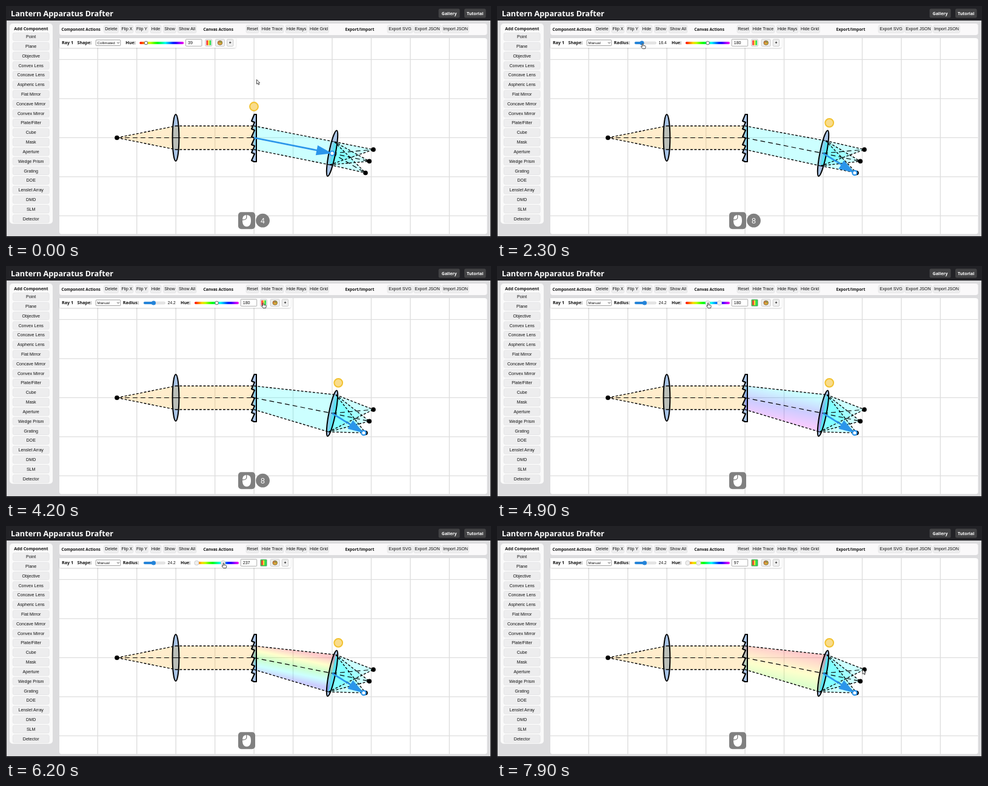
Recreate the animation shown at these times as an HTML page. Size 800 px wide and 383 px high, loop 8 s.

```html
<!DOCTYPE html>
<html lang="en">
<head>
<meta charset="utf-8">
<title>Lantern Apparatus Drafter</title>
<style>
html, body { margin: 0; width: 100%; height: 100%; overflow: hidden; background: #dcdcde; }
svg { display: block; width: 100%; height: 100%; font: 7.1px "Liberation Sans", Arial, sans-serif; }
.ui { font-family: "Open Sans", "Noto Sans", sans-serif; font-weight: 700; }
.mid { text-anchor: middle; }
.edge { stroke: #000; stroke-width: 1.35; stroke-dasharray: 3.9 2.6; }
.axis { stroke: #000; stroke-width: 1.2; stroke-dasharray: 7.8 5.2; }
.glass { fill: #a9c4e6; }
.outline { fill: none; stroke: #000; stroke-width: 2; stroke-linejoin: round; }
.cursor { fill: #fff; stroke: #222; stroke-width: .8; stroke-linejoin: round; }
</style>
</head>
<body>
<svg viewBox="0 0 800 383" preserveAspectRatio="none">
  <defs>
    <linearGradient id="spectrum"></linearGradient>
    <filter id="shadow" x="-5%" y="-30%" width="110%" height="180%">
      <feDropShadow dx="0" dy="1" stdDeviation="1.2" flood-opacity=".2"/>
    </filter>
  </defs>
  <g id="page"></g>
  <g id="scene"></g>
</svg>
<script>
const LOOP = 8000, STEP = 100, UNIT = 1.29;
const $ = id => document.getElementById(id);

const rect = (x, y, w, h, fill, r = 0, extra = '') =>
  `<rect x="${x}" y="${y}" width="${w}" height="${h}" rx="${r}" fill="${fill}" ${extra}/>`;
const text = (s, x, y, cls = '', size = 7.1, fill = '#111') =>
  `<text x="${x}" y="${y}" class="${cls}" style="font-size:${size}px" fill="${fill}">${s}</text>`;
const line = (a, b, cls) => `<line x1="${a[0]}" y1="${a[1]}" x2="${b[0]}" y2="${b[1]}" class="${cls}"/>`;
const dot = (p, r, fill, extra = '') => `<circle cx="${p[0]}" cy="${p[1]}" r="${r}" fill="${fill}" ${extra}/>`;
const poly = (points, fill, extra = '') => `<polygon points="${points.join(' ')}" fill="${fill}" ${extra}/>`;
const button = (s, cx, y, w, h = 13) =>
  rect(cx - w / 2, y, w, h, '#ededee', 2.5, 'stroke="#dfdfe1" stroke-width=".6"') + text(s, cx, y + h / 2 + 2.4, 'mid');
const hsl = h => `hsl(${h},100%,50%)`;
const stops = (from, to) => Array.from({ length: 13 }, (_, i) =>
  `<stop offset="${i / 12}" stop-color="${hsl(from + (to - from) * i / 12)}"/>`).join('');

// Eased value of a track of [time, ...values] keys.
function at(keys, t) {
  const i = keys.findIndex(k => k[0] > t);
  if (i < 0) return keys[keys.length - 1].slice(1);
  if (!i) return keys[0].slice(1);
  const a = keys[i - 1], b = keys[i], u = (t - a[0]) / (b[0] - a[0]), e = u * u * (3 - 2 * u);
  return a.slice(1).map((v, j) => v + (b[j + 1] - v) * e);
}

const MENU = ['Point', 'Plane', 'Objective', 'Convex Lens', 'Concave Lens', 'Aspheric Lens', 'Flat Mirror',
  'Concave Mirror', 'Convex Mirror', 'Plate/Filter', 'Cube', 'Mask', 'Aperture', 'Wedge Prism', 'Grating',
  'DOE', 'Lenslet Array', 'DMD', 'SLM', 'Detector'];
const TOOLS = [['Delete', 173.5, 24], ['Flip X', 199.5, 21], ['Flip Y', 224, 21], ['Hide', 247, 18],
  ['Show', 270, 21], ['Show All', 298.5, 31], ['Reset', 406.5, 21], ['Hide Trace', 439, 38],
  ['Hide Rays', 479, 36], ['Hide Grid', 516, 33], ['Export SVG', 650, 42], ['Export JSON', 695, 45],
  ['Import JSON', 741.5, 44]];

function drawPage() {
  let s = rect(0, 0, 800, 383, '#222226') + rect(1, 24, 798, 356, '#dcdcde');
  s += text('Lantern Apparatus Drafter', 8, 17.3, 'ui', 12.7, '#fff');
  s += rect(713.5, 4.5, 35, 15, '#434345', 2.5) + text('Gallery', 731, 14.8, 'ui mid', 7, '#fff');
  s += rect(756, 4.5, 35.5, 15, '#434345', 2.5) + text('Tutorial', 773.7, 14.8, 'ui mid', 7, '#fff');
  s += rect(6, 29, 71, 330.5, '#fafafa', 5) + text('Add Component', 41.3, 40, 'ui mid', 7);
  MENU.forEach((m, i) => s += button(m, 41.2, 44.3 + i * 15.81, 60));
  s += rect(88, 29, 705.5, 19, '#faf9fa', 4);
  s += text('Component Actions', 91.5, 40.6, 'ui', 6.55) + text('Canvas Actions', 325.5, 40.6, 'ui', 6.55) +
    text('Export/Import', 559.5, 40.6, 'ui', 6.7);
  TOOLS.forEach(([name, x, w]) => s += button(name, x, 31.5, w));
  s += rect(88, 53, 705.5, 323.5, '#fff', 4);
  let grid = '';
  for (let i = 0; i < 10; i++) grid += `M${151.3 + i * 64.45} 53V376.5`;
  for (let i = 0; i < 5; i++) grid += `M88 ${88.4 + i * 64.5}H793.5`;
  $('page').innerHTML = s + `<path d="${grid}" stroke="#dedede" stroke-width="1.4"/>`;
}

const SOURCE = [183, 217.5], FIRST = [280, 217.5], GRATING = [409, 217.5], LENS = [538, 243.2];
const FOCI = [[606, 237], [599.3, 256.3], [593, 275.5]];
const TILT = Math.atan2(LENS[1] - GRATING[1], LENS[0] - GRATING[0]);

const lens = ([x, y], angle, cls) =>
  `<ellipse class="${cls}" rx="5.4" ry="38.5" transform="translate(${x} ${y}) rotate(${angle})"/>`;

function drawParts(cls) {
  let d = 'M413 179H409.5';
  for (let i = 1; i <= 6; i++) d += `L405 ${177 + i * 13}L${i < 6 ? 410 : 409} ${179 + i * 13}`;
  return lens(FIRST, 0, cls) + `<path class="${cls}" d="${d}H413Z"/>` + lens(LENS, TILT * 180 / Math.PI, cls);
}

function drawBeams(radius, low, high, dual) {
  const across = r => [LENS[0] + Math.sin(TILT) * r, LENS[1] - Math.cos(TILT) * r];
  const top = across(radius * UNIT), bottom = across(-radius * UNIT);
  const from = across(radius), to = across(-radius);
  const inTop = [280, 198], inBottom = [280, 237], outTop = [409, 198], outBottom = [409, 237];
  const alpha = 'fill-opacity=".2"';
  const fill = dual ? 'url(#beam)' : hsl(180);
  let s = `<linearGradient id="beam" gradientUnits="userSpaceOnUse" x1="${from[0]}" y1="${from[1]}" x2="${to[0]}" y2="${to[1]}">${stops(low, high)}</linearGradient>`;
  s += drawParts('glass');
  s += poly([SOURCE, inTop, outTop, outBottom, inBottom], hsl(39), alpha);
  s += poly([outTop, top, bottom, outBottom], fill, alpha);
  FOCI.forEach(f => s += poly([top, f, bottom], hsl(180), alpha));
  [[SOURCE, inTop], [inTop, outTop], [SOURCE, inBottom], [inBottom, outBottom], [outTop, top], [outBottom, bottom]]
    .forEach(([a, b]) => s += line(a, b, 'edge'));
  s += line(SOURCE, FIRST, 'axis') + line(FIRST, GRATING, 'axis') + line(GRATING, LENS, 'axis');
  FOCI.forEach(f => s += line(top, f, 'edge') + line(LENS, f, 'axis') + line(bottom, f, 'edge'));
  return s + drawParts('outline') + [SOURCE, ...FOCI].map(p => dot(p, 3.8, '#000')).join('');
}

function drawArrow(a, b) {
  const len = Math.hypot(b[0] - a[0], b[1] - a[1]), ux = (b[0] - a[0]) / len, uy = (b[1] - a[1]) / len;
  const p = (along, side) => [b[0] - ux * along - uy * side, b[1] - uy * along + ux * side];
  return `<line x1="${a[0]}" y1="${a[1]}" x2="${p(20, 0)[0]}" y2="${p(20, 0)[1]}" stroke="#2b95ea" stroke-width="2.6"/>` +
    poly([p(0, 0), p(26, 8.3), p(26, -8.3)], '#2b95ea') + dot(b, 3.7, '#fff', 'stroke="#2b95ea" stroke-width="2.2"');
}

function drawBar({ manual, radius, low, high, dual, value }) {
  const shift = manual ? 90.7 : 0, x = n => n + shift;
  const knob = (h, r, fill, stroke) => dot([x(223.8 + h * .184), 61], r, fill, `stroke="${stroke}" stroke-width=".9"`);
  const box = (cx, w, fill = '#efefef') => rect(x(cx) - w / 2, 55, w, 11.5, fill, 1.5, 'stroke="#bbb" stroke-width=".7"');
  let s = `<path d="M88 53H${x(379)}V66Q${x(379)} 69 ${x(376)} 69H91Q88 69 88 66Z" fill="#fff" filter="url(#shadow)"/>`;
  s += text('Ray 1', 92, 63.2, 'ui', 7.2) + text('Shape:', 117.5, 63.2, 'ui', 7.2) + text('Hue:', x(197.2), 63.2, 'ui', 7.2);
  s += rect(148.3, 56, 40.5, 9.5, '#fff', 1, 'stroke="#777" stroke-width=".7"') +
    text(manual ? 'Manual' : 'Collimated', 150.5, 63, '', 6.2) +
    '<path d="M183.2 59.8l1.8 1.9l1.8-1.9" fill="none" stroke="#333" stroke-width=".9"/>';
  if (manual) {
    const k = 229.5 + radius * .577;
    s += text('Radius:', 192.8, 63.2, 'ui', 7.2) + rect(227, 59.2, 35.5, 3.6, '#e6e6e6', 1.8, 'stroke="#c4c4c4" stroke-width=".5"') +
      rect(227, 59, k - 227, 4, '#2584d8', 2) + dot([k, 61], 3.6, '#2584d8') + text(radius.toFixed(1), 266.8, 63.3, '', 6.6);
  }
  s += rect(x(220.3), 59, 73, 3.9, 'url(#spectrum)', 2);
  s += dual ? knob(low, 3.7, '#eee', '#c8c8c8') + knob(high, 3.7, '#eee', '#c8c8c8') : knob(low, 2.8, '#fff', '#555');
  s += rect(x(296.5), 55, 26.5, 11.3, '#fff', 1, 'stroke="#888" stroke-width=".7"') + text(Math.round(value), x(300), 63.3);
  s += box(334.3, 11, dual ? '#35c94a' : '#efefef');
  ['#f33', '#fd3', '#3d5'].forEach((c, i) => s += rect(x(330.5 + i * 2.6), 56.7, 2.6, 8, c));
  s += box(353, 15) + `<ellipse cx="${x(353)}" cy="60.8" rx="3.8" ry="3.5" fill="#d9a63c" stroke="#6b4a18" stroke-width=".7"/>`;
  ['#d33', '#36c', '#393'].forEach((c, i) => s += dot([x(351.1 + i * 1.8), 59.7 + (i % 2) * -.7], .8, c));
  return s + box(369.7, 10.5) + text('+', x(369.7), 63.3, 'ui mid', 7);
}

function drawBadge(count) {
  let s = rect(383, 340.3, 28, 28, '#808080', 5);
  s += '<path d="M397 345C402.5 345 404 348.5 404 354.5S401.5 364.2 397 364.2S390 360.5 390 354.5S391.5 345 397 345Z" fill="#fff"/>' +
    '<path d="M396.8 345V349.5Q396.3 353.2 390 353" fill="none" stroke="#808080" stroke-width="1.3"/>';
  if (count) s += dot([423.5, 354.2], 11.4, '#808080') + text(count, 423.5, 358.5, 'mid', 12.5, '#fff');
  return s;
}

function drawCursor([x, y], hand) {
  const d = hand
    ? 'M0 .4Q.8-.8 1.6 .4V3.2L4.9 3.8Q6 4.1 5.7 5.4L5 8.4H.6L-2 5.2Q-2 4.1-.9 4.5L0 5.2Z'
    : 'M0 0V7.4L1.7 5.9L3 8.6L4.3 8L3 5.4H5.2Z';
  return `<path class="cursor" d="${d}" transform="translate(${x} ${y})"/>`;
}

const POINTER = [[0, 413.5, 121.5], [500, 540, 246], [600, 540, 246], [1100, 177.5, 58], [1300, 177.5, 58],
  [1600, 168, 75], [1700, 168, 75], [2100, 238.5, 61.5], [2300, 239.5, 62], [3000, 244, 62], [3600, 244, 62],
  [4200, 423.5, 61], [4500, 423.5, 61], [4900, 347.5, 61], [5400, 312.5, 61.5], [5500, 312.5, 61.5],
  [5900, 367, 61], [6800, 332.5, 61.5], [7100, 332.5, 61.5], [7800, 603, 237]];
const RADIUS = [[2100, 15], [2300, 16.4], [3000, 24.2]];
const LOW = [[4900, 180], [5400, 0]];
const HIGH = [[5900, 286], [6800, 97]];
const CLICKS = [[0, 4], [600, 5], [1300, 6], [1700, 7], [2100, 8], [4400, 0]];

function draw(t) {
  const onLens = t >= 600, manual = t >= 1700, dual = t >= 4400;
  const [radius] = at(RADIUS, t), [high] = at(HIGH, t);
  const low = onLens ? at(LOW, t)[0] : 39, value = t < 5900 ? low : high;
  const pointer = at(POINTER, t);
  const count = CLICKS.filter(c => c[0] <= t).pop()[1];
  $('scene').innerHTML = drawBeams(radius, low, high, dual) +
    (onLens ? drawArrow(LENS, [590, 275.5]) : drawArrow(GRATING, LENS)) +
    dot(onLens ? [548.2, 192.8] : [409, 166], 6.9, '#f9dc8b', 'stroke="#f2c230" stroke-width="2"') +
    drawBar({ manual, radius, low, high, dual, value }) + drawBadge(count) +
    drawCursor(pointer, pointer[1] < 72 && t > 900);
}

$('spectrum').innerHTML = stops(0, 305);
drawPage();
let shown = -1;
function tick(now) {
  const t = Math.floor(now % LOOP / STEP) * STEP;
  if (t !== shown) draw(shown = t);
  requestAnimationFrame(tick);
}
tick(performance.now());
</script>
</body>
</html>
```
